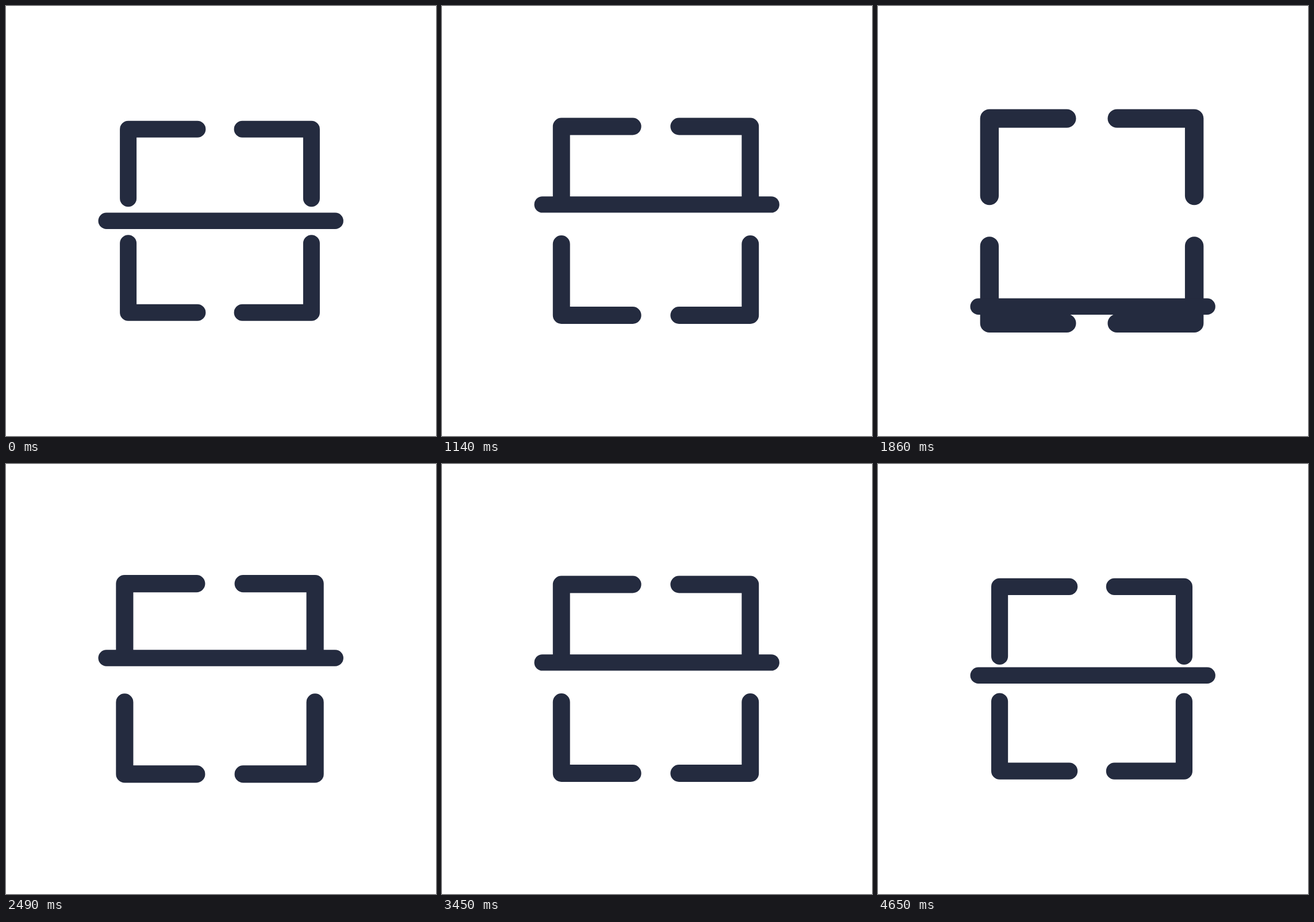
Recreate the animation shown at these times as an HTML page with a canvas. Size 748 by 748 pixels, loop 4.68 s.

```html
<!DOCTYPE html>
<html lang="en">
<head>
<meta charset="utf-8">
<title>Scan icon</title>
<style>
html, body { margin: 0; width: 100%; height: 100%; overflow: hidden; background: #fff; }
canvas { display: block; width: 748px; height: 748px; }
</style>
</head>
<body>
<canvas id="stage" width="748" height="748"></canvas>
<script>
const ctx = document.getElementById('stage').getContext('2d');
const INK = '#242b3f';
const STEP = 30, LOOP_STEPS = 156, CYCLE_STEPS = 77;
const CENTER = { x: 372, y: 373.75 };
const HALF = 173.9; // outer half size of the resting frame

// [step, bar offset, frame growth], linear in between
const KEYS = [
  [0, 0, 0],
  [23.3, -141, 26.4],
  [41.7, 0, 0],
  [61, 159, 21.8],
  [77, 0, 0]
];

function poseAt(step) {
  const i = KEYS.findIndex(key => step < key[0]);
  const from = KEYS[i - 1], to = KEYS[i];
  const p = (step - from[0]) / (to[0] - from[0]);
  const mix = k => from[k] + (to[k] - from[k]) * p;
  // the last stretch bows slightly to the left
  const drift = i === KEYS.length - 1 ? -12.9 * p * p * (1 - p) : 0;
  return { bar: mix(1), growth: mix(2), drift };
}

function strokePath(points, width) {
  ctx.lineWidth = width;
  ctx.beginPath();
  points.forEach(([x, y]) => ctx.lineTo(x, y));
  ctx.stroke();
}

function drawCorners(scale) {
  const far = 159.4, near = 39.1;
  for (const sx of [-1, 1]) {
    for (const sy of [-1, 1]) {
      ctx.save();
      ctx.translate(CENTER.x, CENTER.y);
      ctx.scale(sx * scale, sy * scale);
      strokePath([[near, far], [far, far], [far, near]], 29);
      ctx.restore();
    }
  }
}

function draw(time) {
  const step = Math.floor(time / STEP + 1e-6) % LOOP_STEPS % CYCLE_STEPS;
  const { bar, growth, drift } = poseAt(step);
  ctx.fillStyle = '#fff';
  ctx.fillRect(0, 0, 748, 748);
  ctx.strokeStyle = INK;
  ctx.lineCap = ctx.lineJoin = 'round';
  drawCorners(1 + growth / HALF);
  const y = CENTER.y + bar;
  strokePath([[174.7 + drift, y], [572.7 + drift, y]], 28.4);
}

let start;
function tick(now) {
  start ??= now;
  draw(now - start);
  requestAnimationFrame(tick);
}
draw(0);
requestAnimationFrame(tick);
</script>
</body>
</html>
```
